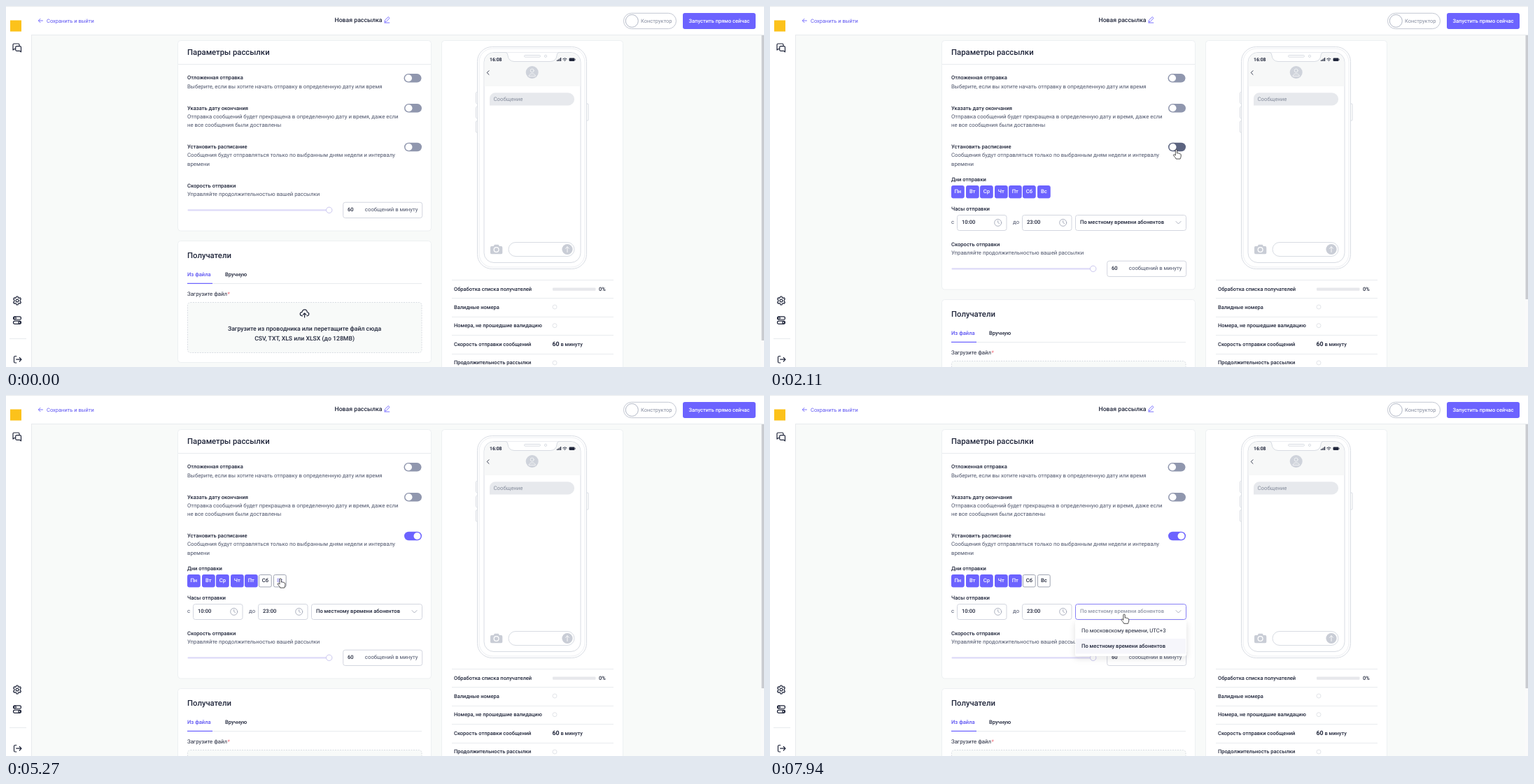
Write an HTML page that moves like this. It is 1083x517 px and loops after 7990 ms.

```html
<!DOCTYPE html>
<html lang="ru">
<head>
<meta charset="utf-8">
<style>
html, body { margin: 0; width: 100%; height: 100%; overflow: hidden; background: #fff; }
svg { display: block; width: 100vw; height: 100vh; font: 7.8px Roboto, "Open Sans", sans-serif; text-rendering: geometricPrecision; fill: #20263b; }
.h { font-size: 11.3px; font-weight: 500; }
.b { font-size: 7.6px; font-weight: 500; }
.d { fill: #4d546b; }
.m { font-size: 8.7px; font-weight: 500; }
.s { font-size: 7.5px; font-weight: 500; }
.p { fill: #5d54f2; }
.w { fill: #fff; }
.c { text-anchor: middle; }
.box { fill: #fff; stroke: #ced2dc; stroke-width: .9; }
.card { fill: #fff; stroke: #edf0f2; }
.line { fill: none; stroke: #e8ebee; }
.icon { fill: none; stroke: #20263b; stroke-width: 1.2; stroke-linecap: round; stroke-linejoin: round; }
.gray { stroke: #a3a9b8; stroke-width: .9; }
.thin { stroke-width: .9; }
.phone { fill: #fff; stroke: #d8dce3; }
</style>
</head>
<body>
<svg viewBox="0 0 1083 517" preserveAspectRatio="none">
  <defs>
    <rect id="track" x="-12.5" y="-6.2" width="25" height="12.4" rx="6.2"/>
    <g id="off"><use href="#track" fill="#9097ae"/><circle cx="-6" r="5" class="w"/></g>
    <g id="clock" class="icon gray"><circle r="5"/><path d="M0-3V0L2 1.2"/></g>
    <filter id="shadow" x="-15%" y="-30%" width="130%" height="180%">
      <feDropShadow dx="0" dy="3" stdDeviation="4" flood-color="#20263b" flood-opacity=".13"/>
    </filter>
  </defs>

  <rect width="1083" height="517" fill="#f8faf9"/>

  <!-- settings card -->
  <rect id="card" class="card" x="245.5" y="49.5" width="362" height="272.5" rx="4"/>
  <path class="line" d="M246 83.5H607"/>
  <text class="h" x="259" y="69.5">Параметры рассылки</text>
  <text class="b" x="259" y="105">Отложенная отправка</text>
  <text class="d" x="259" y="117.5">Выберите, если вы хотите начать отправку в определенную дату или время</text>
  <text class="b" x="259" y="148.5">Указать дату окончания</text>
  <text class="d" x="259" y="160.5">Отправка сообщений будет прекращена в определенную дату и время, даже если</text>
  <text class="d" x="259" y="173">не все сообщения были доставлены</text>
  <text class="b" x="259" y="204">Установить расписание</text>
  <text class="d" x="259" y="216.3">Сообщения будут отправляться только по выбранным дням недели и интервалу</text>
  <text class="d" x="259" y="228.8">времени</text>
  <use href="#off" x="581" y="103.3"/>
  <use href="#off" x="581.5" y="146.3"/>
  <g transform="translate(581.5 202)">
    <use id="toggle" href="#track"/>
    <circle id="knob" r="5" class="w"/>
  </g>

  <g id="schedule">
    <text class="b" x="259" y="250.5">Дни отправки</text>
    <g id="days"></g>
    <text class="b" x="259" y="292.5">Часы отправки</text>
    <text class="d" x="259" y="312.3">с</text>
    <text class="d" x="347" y="312.3">до</text>
    <rect class="box" x="267.5" y="299.5" width="70.5" height="22" rx="3"/>
    <rect class="box" x="360.5" y="299.5" width="70.5" height="22" rx="3"/>
    <rect id="select" class="box" x="436.5" y="299.5" width="158" height="22" rx="3"/>
    <text class="b" x="274" y="312.3">10:00</text>
    <text class="b" x="367" y="312.3">23:00</text>
    <use href="#clock" x="325.7" y="310.3"/>
    <use href="#clock" x="418.7" y="310.3"/>
    <text id="choice" class="b" x="443" y="312.3">По местному времени абонентов</text>
    <path class="icon gray" d="M580 308.5L583.5 312L587 308.5"/>
  </g>

  <g id="lower">
    <text class="b" x="259" y="259.5">Скорость отправки</text>
    <text class="d" x="259" y="271.8">Управляйте продолжительностью вашей рассылки</text>
    <rect x="259.5" y="291.2" width="199" height="2.2" rx="1" fill="#dddaf8"/>
    <circle cx="461.7" cy="292.3" r="4.2" fill="#fff" stroke="#c9c6ef"/>
    <rect class="box" x="481.7" y="281.2" width="113" height="22.3" rx="3"/>
    <text class="b" x="488" y="294.3">60</text>
    <text class="d" x="588.5" y="294.3" text-anchor="end">сообщений в минуту</text>

    <rect class="card" x="245.5" y="336.5" width="362" height="174" rx="4"/>
    <text class="h" x="259" y="361">Получатели</text>
    <text class="b p" x="259" y="386.5">Из файла</text>
    <text class="b" x="313" y="386.5">Вручную</text>
    <path class="line" d="M259 397.5H594"/>
    <path d="M259 397.3H295" stroke="#6c63ff" stroke-width="1.3"/>
    <text x="259" y="415">Загрузите файл <tspan dx="-1.5" fill="#f0616d">*</tspan></text>
    <rect x="259.5" y="424.5" width="334.5" height="72" rx="4" fill="#f8faf9" stroke="#d5d9df" stroke-width=".9" stroke-dasharray="2 1.5"/>
    <path class="icon" d="M423.5 443.8C419 443.5 419.5 438.5 423 438.3C424 433.5 430 434 430.3 438.5C433.8 439 433.5 443.5 430 443.8M426.6 446V439.8M424.4 442L426.6 439.8L428.8 442"/>
    <text class="m c" x="426.6" y="465.3">Загрузите из проводника или перетащите файл сюда</text>
    <text class="m c" x="426.6" y="479.3">CSV, TXT, XLS или XLSX (до 128MB)</text>
  </g>

  <!-- preview card -->
  <rect class="card" x="622.5" y="49.5" width="259" height="480" rx="4"/>
  <g class="phone">
    <rect x="671.5" y="123.5" width="4" height="16" rx="1"/>
    <rect x="671.5" y="144.5" width="4" height="16" rx="1"/>
    <rect x="671.5" y="165" width="4" height="16" rx="1"/>
    <rect x="828" y="140" width="4" height="24" rx="1"/>
    <rect x="673.5" y="58.5" width="156" height="318" rx="21"/>
    <rect x="676" y="61" width="151" height="313" rx="19" stroke="#eceef2"/>
    <rect x="683" y="66.5" width="138" height="301" rx="14"/>
    <path d="M683.5 115V81A14 14 0 0 1 697 67H807A14 14 0 0 1 820.5 81V115Z" fill="#f7f8f8" stroke="none"/>
    <path d="M714 66.5Q717 67 717 71Q718 79 726 79.5H778Q786 79 787 71Q787 67 790 66.5"/>
    <rect x="740.5" y="70.5" width="23" height="2.6" rx="1.3"/>
    <circle cx="771" cy="71.8" r="1.6"/>
    <rect x="718" y="338.5" width="94" height="20" rx="10"/>
  </g>
  <text x="691" y="78.5" font-size="6.8" font-weight="700">16:08</text>
  <path d="M787.5 79V77.5M789.2 79V76.5M790.9 79V75.2M792.6 79V74" stroke="#20263b" stroke-width="1.1"/>
  <path class="icon thin" d="M795.7 75.8Q798.4 73.5 801.1 75.8M797 77.3Q798.4 76.1 799.8 77.3M798.4 78.7V78.8"/>
  <rect x="804.5" y="74.6" width="8" height="4.3" rx="1.2"/><path d="M813.2 75.7V77.8" stroke="#20263b" stroke-width=".7"/>
  <path class="icon thin" d="M690 92.7L687.2 95.5L690 98.3"/>
  <circle cx="751.7" cy="95" r="9" fill="#cfd3db"/>
  <g class="icon thin" style="stroke:#f4f5f7"><circle cx="751.7" cy="92.5" r="2.5"/><path d="M747 100C747.5 95.8 756 95.8 756.4 100Z"/></g>
  <path d="M691 142.5V132A8 8 0 0 1 699 124.3H803A9 9 0 0 1 803 142.5Z" fill="#e7e9ed"/>
  <text x="696.5" y="135.7" fill="#858c9c">Сообщение</text>
  <path d="M693.5 344H696.5L698 341.7H703.5L705 344H707.5Q709.3 344 709.3 346V353.5Q709.3 355.3 707.5 355.3H693.8Q692 355.3 692 353.5V346Q692 344 693.5 344Z" fill="#c9cdd6"/>
  <circle cx="700.6" cy="349" r="3.4" fill="#c9cdd6" stroke="#fff" stroke-width="1.3"/>
  <circle cx="802" cy="348.5" r="7.6" fill="#c9cdd6"/>
  <path class="icon thin" style="stroke:#fff" d="M802 352.5V344.8M799.5 347.3L802 344.8L804.5 347.3"/>

  <path class="line" d="M637 392.5H868M637 418.5H868M637 445.3H868M637 471.5H868M637 498.5H868"/>
  <g class="s">
    <text x="640" y="407.5">Обработка списка получателей</text>
    <text x="640" y="433.8">Валидные номера</text>
    <text x="640" y="460.3">Номера, не прошедшие валидацию</text>
    <text x="640" y="487">Скорость отправки сообщений</text>
    <text x="640" y="513.3">Продолжительность рассылки</text>
    <text x="847" y="407.5">0%</text>
    <text x="780.5" y="487"><tspan font-size="8.8" font-weight="700">60</tspan> в минуту</text>
  </g>
  <rect x="781" y="403.6" width="61.5" height="4.2" rx="1" fill="#e7e8ec"/>
  <g fill="none" stroke="#e2e5e9"><circle cx="784" cy="431" r="3"/><circle cx="784" cy="457.7" r="3"/><circle cx="784" cy="511" r="3"/></g>

  <!-- scrollbar, header and sidebar -->
  <rect x="1079" y="42" width="4" height="475" fill="#fafafa"/>
  <rect id="thumb" x="1079.5" y="42" width="3.5" height="437" fill="#c9cbd0"/>
  <path d="M0 0H1083V41.5H36V517H0Z" class="w"/>
  <path class="line" d="M0 .5H1083M36 41.5H1083M36.5 42V517M5 476.5H29"/>
  <rect x="6" y="20.5" width="16" height="16" fill="#fcc21b"/>
  <g class="icon">
    <path d="M13.5 61.5H12L10 63V55.5Q10 54 11.5 54H17.5Q19 54 19 55.5V57M15.2 57.7H20Q21.5 57.7 21.5 59.2V65.8L19.5 64.3H15.2Q13.7 64.3 13.7 62.8V59.2Q13.7 57.7 15.2 57.7Z"/>
    <path d="M14.6 417L15 416H17L17.4 417.8L18.6 418.4L20.3 417.9L21.4 419.7L20.2 421V423L21.4 424.4L20.3 426.2L18.6 425.7L17.4 426.3L17 428H15L14.6 426.3L13.4 425.7L11.7 426.2L10.6 424.4L11.8 423V421L10.6 419.7L11.7 417.9L13.4 418.4Z"/>
    <circle cx="16" cy="422" r="1.9"/>
    <rect x="10.5" y="444.8" width="11" height="4.2" rx="2.1"/><rect x="10.5" y="451.2" width="11" height="4.2" rx="2.1"/>
    <circle cx="12.8" cy="446.9" r="1.5"/><circle cx="19.2" cy="453.3" r="1.5"/>
    <path d="M14.8 501.5H13Q11.5 501.5 11.5 503V509.5Q11.5 511 13 511H14.8M14.7 506.2H22M19.3 503.5L22 506.2L19.3 509"/>
    <path d="M52.5 21H46.5M49 18.3L46.4 21L49 23.7" stroke="#6c63ff" stroke-width=".9"/>
    <path d="M541 22.8L541.5 20.2L546.2 15.6L548 17.4L543.4 22.2ZM540.8 24H547.8" stroke="#6c63ff" stroke-width=".9"/>
  </g>
  <text class="p" x="58" y="24.3" font-size="7.5">Сохранить и выйти</text>
  <text class="m" x="469.5" y="22.7">Новая рассылка</text>
  <rect class="box" x="882.5" y="10.3" width="75" height="22.3" rx="11.1" style="stroke:#bcc1cd"/>
  <circle cx="894.3" cy="21.4" r="9" class="box" style="stroke:#a9afbf"/>
  <text x="907" y="23.5" font-size="7.5" fill="#858c9f">Конструктор</text>
  <rect x="967" y="10" width="104" height="23" rx="3" fill="#6c63ff"/>
  <text class="s w c" x="1019" y="23.5">Запустить прямо сейчас</text>

  <g id="tooltip">
    <rect x="511.5" y="322.5" width="114" height="13.5" fill="#fff" stroke="#666" stroke-width=".9"/>
    <text x="516" y="332" font-size="7" fill="#555">По местному времени абонентов</text>
  </g>
  <g id="menu">
    <rect class="w" x="436" y="323.5" width="159" height="50.5" rx="3" filter="url(#shadow)"/>
    <rect x="437" y="349" width="157" height="21.5" fill="#f6f6fb"/>
    <text x="445" y="339.5" font-size="7.7">По московскому времени, UTC+3</text>
    <text class="b" x="445" y="362">По местному времени абонентов</text>
  </g>
  <g id="cursor" stroke="#222" stroke-width=".8" stroke-linejoin="round" fill="#fff">
    <path id="arrow" d="M0 0V10L2.3 7.9L3.9 11.4L5.4 10.7L3.8 7.3H7Z"/>
    <path id="hand" d="M-1.2 .6C-1.2-.6 1.2-.6 1.2 .6V5C2 4.3 3.4 4.5 3.5 5.4C4.3 4.8 5.2 5.2 5.3 6C6.2 5.7 6.7 6.3 6.7 7V9.5C6.7 11 5.7 11.6 5.6 13H-.4C-.7 11.5-3 9.5-4 7.8C-4.5 6.8-3 6.2-2.2 7L-1.2 8Z"/>
  </g>
</svg>
<script>
const LOOP = 7990, OPEN = 2110;
const PURPLE = '#6c63ff', DARK = '#20263b';
const $ = id => document.getElementById(id);
const set = (id, attrs) => { for (const k in attrs) $(id).setAttribute(k, attrs[k]); };
const paint = (id, styles) => Object.assign($(id).style, styles);
const show = (id, on) => paint(id, { display: on ? '' : 'none' });
const mix = (a, b, k) => `color-mix(in srgb, ${b} ${k * 100}%, ${a})`;
const ramp = (t, a, b) => Math.max(0, Math.min(1, (t - a) / (b - a)));
const ease = (t, a, b) => { const k = ramp(t, a, b); return k * k * (3 - 2 * k); };

$('days').innerHTML = ['Пн', 'Вт', 'Ср', 'Чт', 'Пт', 'Сб', 'Вс'].map((name, i) => {
  const x = Math.round(259.3 + i * 20.4);
  return `<rect id="day${i}" x="${x + .5}" y="257.5" width="17.7" height="17.4" rx="2" fill="${PURPLE}" stroke="${PURPLE}"/>
    <text id="name${i}" class="b c" x="${x + 9.3}" y="268.3" style="fill:#fff">${name}</text>`;
}).join('');

// cursor path: time, x, y
const path = [
  [240, 1009, 500], [330, 800, 370], [430, 580, 235], [550, 480.5, 171.5], [780, 480.5, 171.5],
  [960, 534, 200], [1200, 569, 206], [1550, 578, 207], [1590, 578, 207], [1760, 578, 200],
  [1920, 578, 200], [1960, 578, 198], [2109, 578, 198], [2110, 580.5, 206], [3200, 580.5, 206],
  [3310, 500, 235], [3420, 400, 262], [3530, 372, 268], [3970, 371, 265], [4250, 371, 265],
  [4520, 392, 263], [5270, 392, 263], [5450, 425, 283], [5700, 488, 309], [6060, 506, 313],
  [6160, 506, 314], [7390, 506, 314], [7940, 506, 314.3]
];
function cursorAt(t) {
  const i = path.findIndex(p => p[0] > t);
  if (i === 0) return path[0].slice(1);
  if (i < 0) return path[path.length - 1].slice(1);
  const [a, ax, ay] = path[i - 1], [b, bx, by] = path[i], k = (t - a) / (b - a);
  return [ax + (bx - ax) * k, ay + (by - ay) * k];
}

function paintDay(i, off, color) {
  paint('day' + i, { fill: mix(PURPLE, '#fff', off), stroke: mix(PURPLE, '#a0a5b3', off) });
  paint('name' + i, { fill: mix('#fff', color, off) });
}

function draw(t) {
  const [x, y] = cursorAt(t);
  const over = (l, top, r, bottom) => x >= l && x <= r && y >= top && y <= bottom;
  const open = t >= OPEN;
  const overSelect = open && over(436, 299, 595, 322);
  const overDay = open && over(259, 257, 401, 276);

  show('cursor', t >= 240);
  set('cursor', { transform: `translate(${x} ${y})` });
  const pointing = overSelect || overDay || over(568.5, 195, 594, 209);
  show('hand', pointing);
  show('arrow', !pointing);

  const track = mix('#9097ae', '#5c6480', ramp(t, 1200, 1400));
  paint('toggle', { fill: mix(track, PURPLE, ramp(t, 2120, 2270)) });
  set('knob', { cx: -6 + 12 * ease(t, 2120, 2270) });

  show('schedule', open);
  set('card', { height: open ? 356.5 : 272.5 });
  set('lower', { transform: `translate(0 ${open ? 84 : 0})` });
  set('thumb', { height: open ? 378 : 437 });

  paintDay(5, ramp(t, 3990, 4150), DARK);
  paintDay(6, ramp(t, 4680, 4840), overDay ? '#9a94f0' : DARK);

  paint('select', { stroke: overSelect ? '#7a72f5' : '' });
  paint('choice', { fill: t > 7130 ? '#9298a8' : DARK });
  show('tooltip', t >= 6710 && t < 7100);
  show('menu', t >= 7130);
  const k = ease(t, 7130, 7350), sy = .8 + .2 * k;
  set('menu', { opacity: k, transform: `translate(0 ${323 * (1 - sy)}) scale(1 ${sy})` });
}

function tick() {
  draw(performance.now() % LOOP);
  requestAnimationFrame(tick);
}
tick();
</script>
</body>
</html>
```
